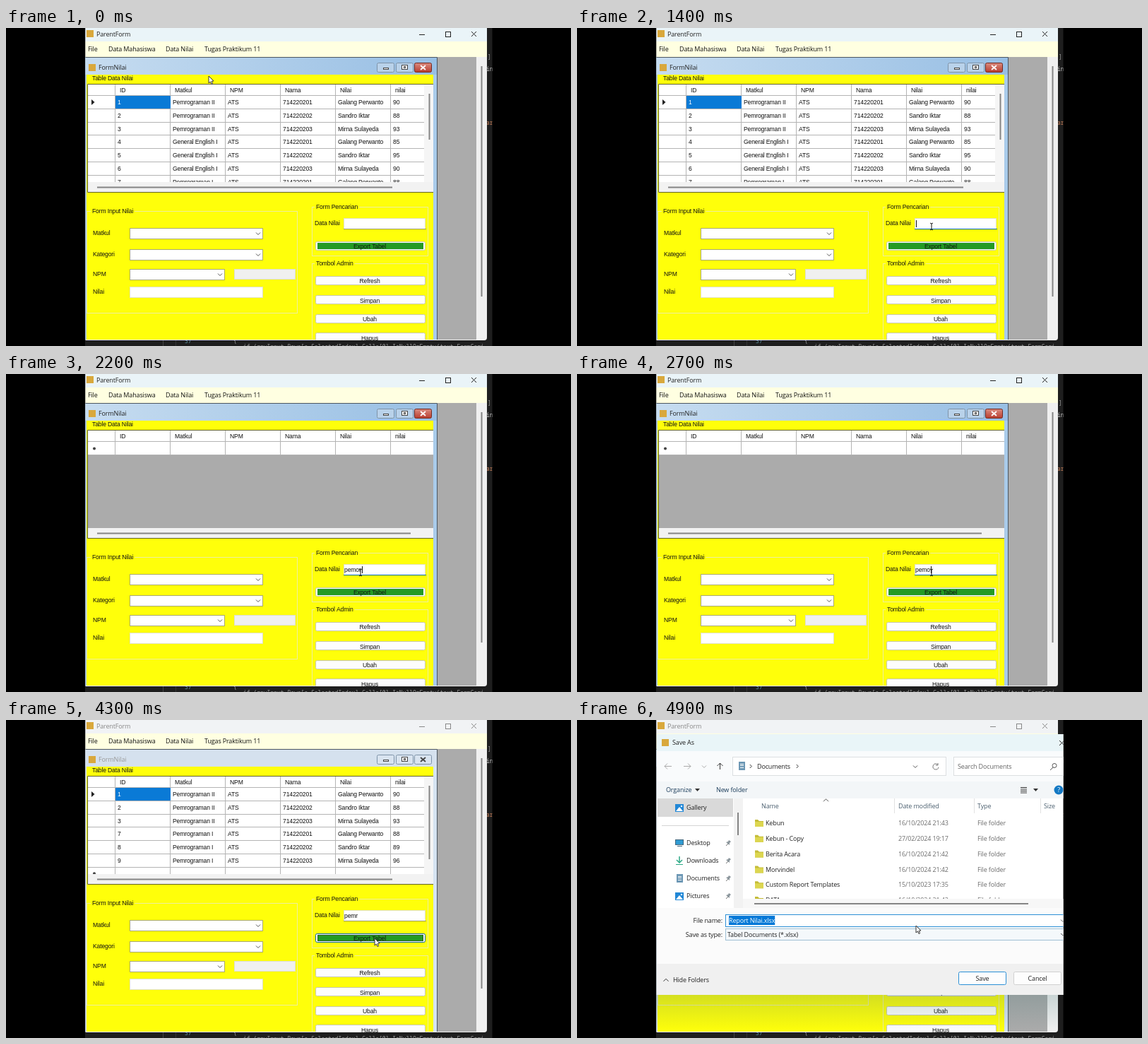
Write an HTML page with a canvas that moves like this. It is 800 px wide and 450 px high and loops after 5 s.

```html
<!DOCTYPE html>
<html lang="id">
<head>
<meta charset="utf-8">
<title>ParentForm</title>
<style>
html, body { margin: 0; width: 100%; height: 100%; overflow: hidden; background: #000; }
canvas { display: block; }
</style>
</head>
<body>
<canvas id="stage" width="800" height="450"></canvas>
<script>
const c = document.getElementById('stage').getContext('2d');
const LOOP = 5000;
const YELLOW = '#ffff0a', GRAY = '#ababab', BLUE = '#0078d7';
const UI = '9px "Open Sans", "Noto Sans", sans-serif';
const FORM = '8.6px "Liberation Sans", Arial, sans-serif';
const CODE = '8px "Noto Sans Mono", "DejaVu Sans Mono", monospace';

function rect(x, y, w, h, fill, stroke) {
  if (fill) { c.fillStyle = fill; c.fillRect(x, y, w, h); }
  if (stroke) { c.strokeStyle = stroke; c.lineWidth = 1; c.strokeRect(x + .5, y + .5, w - 1, h - 1); }
}
function round(x, y, w, h, r, fill, stroke) {
  c.beginPath(); c.roundRect(x + .5, y + .5, w - 1, h - 1, r);
  c.fillStyle = fill; c.fill();
  c.strokeStyle = stroke; c.lineWidth = 1; c.stroke();
}
function path(points, color, width = 1, fill) {
  c.beginPath();
  for (let i = 0; i < points.length; i += 2) c.lineTo(points[i], points[i + 1]);
  if (fill) { c.closePath(); c.fillStyle = fill; c.fill(); }
  if (color) { c.strokeStyle = color; c.lineWidth = width; c.stroke(); }
}
function disc(x, y, r, fill) {
  c.beginPath(); c.arc(x, y, r, 0, 7); c.fillStyle = fill; c.fill();
}
// y is the middle of the capitals
function text(s, x, y, color, font, spacing, align) {
  c.font = font; c.letterSpacing = spacing; c.textAlign = align;
  c.fillStyle = color; c.fillText(s, x, y + 3.2);
}
const ui = (s, x, y, color = '#222', align = 'left') => text(s, x, y, color, UI, '-0.15px', align);
const form = (s, x, y, color = '#111', align = 'left') => text(s, x, y, color, FORM, '-0.15px', align);
const code = (s, x, y, color = '#999') => text(s, x, y, color, CODE, '0px', 'left');
function clip(x, y, w, h, draw) {
  c.save(); c.beginPath(); c.rect(x, y, w, h); c.clip(); draw(); c.restore();
}
function gradient(x0, y0, x1, y1, from, to) {
  const g = c.createLinearGradient(x0, y0, x1, y1);
  g.addColorStop(0, from); g.addColorStop(1, to);
  return g;
}
function chevron(x, y, s, dir, color = '#555') {
  const d = { down: [-s, -s / 2, 0, s / 2, s, -s / 2], up: [-s, s / 2, 0, -s / 2, s, s / 2],
    right: [-s / 2, -s, s / 2, 0, -s / 2, s] }[dir];
  path(d.map((v, i) => v + (i % 2 ? y : x)), color);
}

// ---- timeline ----
const TYPING = [[0, ''], [1700, 'p'], [1800, 'pe'], [1900, 'pem'], [2100, 'pemo'], [2200, 'pemor'],
  [2700, 'pemo'], [2900, 'pem'], [3200, 'pemr']];
const MOVES = [[0, 287, 68], [100, 287, 68], [1200, 502, 281], [3700, 502, 281],
  [4100, 522, 309], [4600, 522, 309], [4800, 480, 291], [5000, 480, 291]];
const ease = u => u * u * (3 - 2 * u);

function pointer(t) {
  const i = MOVES.findIndex(m => m[0] > t), a = MOVES[i - 1], b = MOVES[i];
  const u = ease((t - a[0]) / (b[0] - a[0]));
  return [a[1] + (b[1] - a[1]) * u, a[2] + (b[2] - a[2]) * u];
}

// ---- table data ----
const SUBJECTS = ['Pemrograman II', 'General English I', 'Pemrograman I'];
const STUDENTS = ['Galang Perwanto', 'Sandro Iktar', 'Mirna Sulayeda'];
const ROWS = [90, 88, 93, 85, 95, 90, 88, 89, 96].map((mark, i) =>
  [i + 1, SUBJECTS[Math.floor(i / 3)], 'ATS', 714220201 + i % 3, STUDENTS[i % 3], mark]);
const COLS = [155, 233, 311, 389, 467, 545];
const HEADS = ['ID', 'Matkul', 'NPM', 'Nama', 'Nilai', 'nilai'];

function editorBehind() {
  rect(112, 0, 577, 450, '#1e1e1e');
  path([222.5, 441, 222.5, 450], '#444'); path([240.5, 441, 240.5, 450], '#333');
  code('37', 253, 443, '#5b8f9c');
  code('{', 322, 443);
  code('if (rowInput.Rows[e.SelectedIndex].Cells[0].IsNullOrEmpty(text.FormCari', 336, 451);
  code(']', 682, 41); code('in', 680, 58, '#ccc'); code('ar', 680, 134, '#c8805a');
}

function windowFrame(active) {
  const ink = active ? '#222' : '#888';
  rect(112, 0, 569, 442, '#f0f0f0');
  rect(112, 0, 569, 19, active ? '#eaf4f8' : '#f1f3f5');
  rect(114, 3, 10, 10, '#d9a83c');
  ui('ParentForm', 128, 8.5, ink);
  path([585, 9.5, 593, 9.5], ink);
  rect(622, 5, 8, 8, null, ink);
  path([659, 5, 666, 12], ink); path([666, 5, 659, 12], ink);
  rect(112, 19, 569, 22, '#ffffe1');
  [['File', 116], ['Data Mahasiswa', 145], ['Data Nilai', 226], ['Tugas Praktikum 11', 281]]
    .forEach(([s, x]) => ui(s, x, 30, '#111'));
  rect(112, 41, 554, 400, GRAY);
  path([673.5, 54, 673.5, 380], '#858585', 2);
}

function childFrame(active) {
  rect(112, 41, 499, 400, active ? '#a9cbea' : '#d5e3f1');
  rect(112, 42, 498, 24, active ? gradient(112, 0, 610, 0, '#c6dcf0', '#98bfe4') : '#d5e1ee');
  path([112, 41.5, 610.5, 41.5, 610.5, 441], '#4c5660');
  rect(117, 51, 10, 10, '#d9a83c');
  ui('FormNilai', 131, 56, active ? '#222' : '#999');
  [525, 552, 578].forEach((x, i) => {
    const red = active && i === 2, ink = red ? '#fff' : '#444';
    round(x, 49, 25, 14, 2, red ? gradient(0, 49, 0, 63, '#dc8f83', '#b8392b') : active ? '#b9d2ea' : '#d9e4f0',
      red ? '#72281f' : '#7e93a8');
    if (i === 0) rect(x + 9, 56, 8, 3, '#fff', ink);
    if (i === 1) rect(x + 8, 52, 9, 7, '#fff', ink), rect(x + 11, 54, 3, 3, null, ink);
    if (i === 2) path([x + 9, 53, x + 16, 59], ink, 1.8), path([x + 16, 53, x + 9, 59], ink, 1.8);
  });
  rect(114, 66, 491, 375, YELLOW);
}

function grid(query) {
  const empty = query.startsWith('pemo');
  const rows = empty ? [] : query ? ROWS.filter(r => r[1].startsWith('Pem')) : ROWS;
  const right = empty ? 605 : 592, line = '#b4b4b4';
  form('Table Data Nilai', 122, 70.5);
  rect(115, 79, 490, 154, empty ? GRAY : '#fff');
  rect(116, 80, 489, empty ? 34 : 16, '#fff');
  clip(115, 79, 490, 139, () => {
    HEADS.forEach((h, i) => form(h, COLS[i] + 6, 87.5));
    const bottom = empty ? 114 : 218;
    COLS.forEach(x => path([x - .5, 80, x - .5, bottom], line));
    for (let i = 0; i < (empty ? 2 : 7); i++) {
      const y = Math.round(95 + i * 18.75) + .5;
      path([116, y, right, y], line);
    }
    if (!empty) rect(155, 96, 78, 18, '#0a7ad6');
    rows.slice(0, 7).forEach((row, r) => row.forEach((v, i) =>
      form(v, COLS[i] + 3, 105 + r * 18.75, r + i ? '#111' : '#fff')));
    if (!empty) path([121, 101, 125.5, 105, 121, 109], null, 1, '#222');
    if (rows.length < 7) disc(125, 105.5 + rows.length * 18.75 - (rows.length ? .8 : 0), 2, '#444');
  });
  if (!empty) {
    rect(592, 80, 13, 152, '#f5f5f5');
    path([599.5, 93, 599.5, query ? 197 : 158], '#858585', 2);
  }
  rect(116, 218, 489, 14, '#f2f2f2');
  path([129, 225.5, empty ? 573 : 547, 225.5], '#858585', 2);
  path([605, 79.5, 115.5, 79.5, 115.5, 232.5, 605, 232.5], '#62622a');
}

function group(title, x, y, w, h, tx) {
  rect(x, y, w, h, null, '#eeee9c');
  c.font = FORM; c.letterSpacing = '-0.15px';
  rect(tx - 2, y - 3, c.measureText(title).width + 4, 7, YELLOW);
  form(title, tx, y);
}
function combo(x, y, w) {
  rect(x, y, w, 16, '#fff', '#a9a970');
  chevron(x + w - 7, y + 8, 3, 'down');
}
function button(label, y, textY, fill = '#fdfdfd', edge = '#c8c8b0') {
  round(438, y, 156, 13, 2, '#fdfdfd', edge);
  if (fill !== '#fdfdfd') rect(441, y + 2, 150, 9, fill);
  clip(438, y, 156, 12, () => form(label, 515, textY, '#111', 'center'));
}

function inputs(t, query, caret) {
  const focused = t >= 1300 && t < 4200, pressed = t >= 4200;
  group('Form Input Nilai', 114, 259, 299, 145, 122);
  [['Matkul', 290], ['Kategori', 320], ['NPM', 348], ['Nilai', 373]].forEach(([s, y]) => form(s, 123, y));
  combo(175, 283, 189); combo(175, 313, 189); combo(175, 341, 135);
  rect(323, 341, 87, 15, '#f0f0f0', '#deded0');
  rect(175, 366, 189, 16, '#fff', '#e2e2c0');

  group('Form Pencarian', 433, 253, 165, 70, 439);
  form('Data Nilai', 437, 276);
  rect(478, 269, 116, 16, '#fff', '#e2e2c0');
  rect(478, 284, 117, 1, focused ? '#0067b0' : '#999960');
  form(query, 479, 277);
  if (focused && caret) {
    const x = Math.round(480 + c.measureText(query).width);
    rect(x, 272, 1, 10, '#111');
  }
  button('Export Tabel', 302, 309, '#249a24', pressed ? '#0a64ad' : '#c8c8b0');
  if (pressed) {
    c.setLineDash([1, 1]); rect(441, 304, 150, 9, null, '#222'); c.setLineDash([]);
  }

  group('Tombol Admin', 433, 333, 165, 120, 439);
  button('Refresh', 351, 358); button('Simpan', 378, 386);
  button('Ubah', 405, 412); button('Hapus', 431, 438.5);
}

// ---- save dialog ----
function folder(x, y) {
  path([x, y - 5, x + 4, y - 5, x + 6, y - 3, x + 12, y - 3, x + 12, y + 5, x, y + 5], null, 1, '#c4bc38');
  rect(x, y - 2, 12, 7, '#dcd650');
}
function sheet(x, y) {
  rect(x - 4, y - 6, 9, 12, '#6d98b5');
  rect(x - 2, y - 3, 5, 1, '#fff'); rect(x - 2, y - 1, 5, 1, '#fff'); rect(x - 2, y + 2, 5, 1, '#fff');
}
function monitor(x, y) {
  rect(x - 6, y - 5, 12, 8, '#2f9bd3', '#41667d');
  rect(x - 3, y + 4, 7, 1, '#41667d');
}
function picture(x, y) {
  rect(x - 6, y - 5, 12, 11, '#2187d6');
  path([x - 5, y + 5, x, y - 1, x + 5, y + 5], null, 1, '#fff');
  disc(x + 3, y - 2, 1.2, '#fff');
}
function drive(x, y) {
  rect(x - 6, y, 12, 4, '#7d8a94'); rect(x - 4, y - 4, 9, 4, '#c4d0d8');
}
function download(x, y) {
  path([x, y - 6, x, y + 3], '#2aa884', 1.5);
  path([x - 4, y - 1, x, y + 3, x + 4, y - 1], '#2aa884', 1.5);
  path([x - 5, y + 5.5, x + 5, y + 5.5], '#2aa884');
}
function pin(x, y) {
  path([x - 3, y + 4, x, y + 1], '#777');
  path([x - 3, y - 1, x + 2, y + 3, x + 2, y, x + 4, y - 2, x + 1, y - 4, x, y - 2], null, 1, '#8b969c');
}

function navTree() {
  folder(139, 124); ui('Tio', 155, 124);
  chevron(125, 174, 3.5, 'down', '#333'); monitor(145, 174); ui('This PC', 155, 174);
  [['local disk SSD', 199], ['New Volume (E:)', 224]].forEach(([s, y]) => {
    chevron(131, y, 3, 'right'); drive(151, y); ui(s, 162, y);
  });
  rect(146, 193, 4, 4, '#2f9bd3');
  chevron(125, 249, 3, 'right'); monitor(145, 249); ui('Network', 155, 249);
}
function navTop() {
  rect(114, 111, 108, 26, '#d9d9d9');
  picture(145, 124); ui('Gallery', 155, 124);
  [['Desktop', monitor], ['Downloads', download], ['Documents', sheet], ['Pictures', picture]]
    .forEach(([s, icon], i) => {
      const y = 174 + i * 25;
      icon(145, y); ui(s, 155, y); pin(214, y);
    });
}

function dialog(t) {
  const top = t >= 4700, hover = pointer(t)[1] >= 295;
  rect(112, 389, 569, 52, gradient(0, 389, 0, 441, 'rgba(60,110,110,.22)', 'rgba(60,110,110,0)'));
  rect(113, 20, 576, 369, '#fff');
  rect(113, 20, 576, 24, '#e9f5f8');
  rect(120, 27, 10, 10, '#d9a83c');
  ui('Save As', 135, 32);
  path([683, 29, 690, 36], '#222'); path([690, 29, 683, 36], '#222');

  rect(113, 44, 576, 43, '#f9fbfc');
  const arrow = (x, s) => {
    path([x - 5 * s, 65.5, x + 5 * s, 65.5], '#aaa');
    path([x + s, 61.5, x + 5 * s, 65.5, x + s, 69.5], '#aaa');
  };
  arrow(129, -1); arrow(156, 1);
  chevron(180, 66, 3, 'down', '#aaa');
  path([202.5, 70, 202.5, 61], '#333'); path([198.5, 65, 202.5, 61, 206.5, 65], '#333');
  rect(220, 52, 303, 27, '#fff', '#dcdfe1');
  sheet(233, 65);
  chevron(246, 65.5, 2.5, 'right', '#333'); ui('Documents', 255, 65.5); chevron(312, 65.5, 2.5, 'right', '#333');
  chevron(479, 66, 3, 'down');
  c.beginPath(); c.arc(508, 66, 4, .2, 5.5); c.strokeStyle = '#777'; c.stroke();
  path([511, 61, 511, 64, 508, 64], '#777');
  rect(533, 52, 165, 27, '#fff', '#dcdfe1');
  ui('Search Documents', 539, 65.5, '#666');
  c.beginPath(); c.arc(676, 64.5, 3, 0, 7); c.strokeStyle = '#555'; c.stroke();
  path([674, 67, 670, 71], '#555');

  rect(113, 87, 576, 24, '#f3f6f8');
  ui('Organize', 126, 99, '#1d3e5c'); path([167, 97, 174, 97, 170.5, 101], null, 1, '#333');
  ui('New folder', 197, 99, '#1d3e5c');
  for (let y = 95; y < 104; y += 2.5) rect(628, y, 9, 1, '#333');
  path([646, 97, 653, 97, 649.5, 101], null, 1, '#333');
  disc(682, 99, 6.5, '#1479c4'); ui('?', 682, 99, '#fff', 'center');

  clip(113, 111, 108, 147, top ? navTop : navTree);
  path([120, 149.5, 215, 149.5], '#d5d5d5');
  rect(222, 111, 13, 155, '#f2f2f2');
  path([228, top ? 131 : 215, 228, top ? 163 : 247], '#858585', 2);

  [['Name', 261], ['Date modified', 455], ['Type', 567], ['Size', 661]]
    .forEach(([s, x]) => ui(s, x, 121.5, '#4c6070'));
  [449.5, 562.5, 656.5].forEach(x => path([x, 111, x, 132], '#e1e1e1'));
  chevron(352.5, 113.5, 3.5, 'up');
  clip(235, 132, 453, 121, () => [
    ['Kebun', '16/10/2024 21:43'], ['Kebun - Copy', '27/02/2024 19:17'],
    ['Berita Acara', '16/10/2024 21:42'], ['Morvindel', '16/10/2024 21:42'],
    ['Custom Report Templates', '15/10/2023 17:35'], ['DATA', '16/10/2024 21:42']
  ].forEach(([name, date], i) => {
    const y = 146 + i * 21.8;
    folder(252, y); ui(name, 267, y);
    ui(date, 455, y, '#6b6b6b'); ui('File folder', 567, y, '#6b6b6b');
  }));
  rect(235, 253, 454, 13, '#f7f7f7');
  path([251, 260, 639, 260], '#858585', 2);

  rect(113, 266, 576, 79, '#fbfbfb');
  ui('File name:', 206, 284, '#222', 'right');
  rect(210, 275, 490, 18, '#fff', '#2b8fd6');
  c.font = UI; c.letterSpacing = '-0.15px';
  rect(215, 277, c.measureText('Report Nilai.xlsx').width, 13, BLUE);
  ui('Report Nilai.xlsx', 215, 283.5, '#fff');
  ui('Save as type:', 206, 303.5, '#222', 'right');
  rect(210, 295, 490, 17, hover ? '#e8f2fa' : '#f4f8fb', hover ? '#3f93d0' : '#9fc0d4');
  ui('Tabel Documents (*.xlsx)', 213, 303.5);
  chevron(688, 284, 3, 'down'); chevron(688, 303.5, 3, 'down');

  rect(113, 345, 576, 44, '#f0f0f0');
  chevron(126, 368, 3.5, 'up', '#333'); ui('Hide Folders', 136, 367.5);
  round(540, 356, 68, 19, 2, '#fdfdfd', '#2b8fd6'); ui('Save', 574, 365.5, '#222', 'center');
  round(618, 356, 68, 19, 2, '#fdfdfd', '#d0d0d0'); ui('Cancel', 652, 365.5, '#222', 'center');
}

function cursor(t) {
  const [x, y] = pointer(t);
  if (t < 4300 && x > 478 && x < 594 && y > 269 && y < 285) {
    path([x - 2, y - 5, x, y - 4, x + 2, y - 5], '#111');
    path([x, y - 4, x, y + 4], '#111');
    path([x - 2, y + 5, x, y + 4, x + 2, y + 5], '#111');
  } else {
    path([0, 0, 0, 10, 2.4, 8, 4, 11.5, 5.6, 10.8, 4.1, 7.3, 7, 7, 0, 0].map((v, i) => v + (i % 2 ? y : x)),
      '#333', 1, '#fff');
  }
}

function draw(t) {
  const [since, query] = TYPING.filter(k => k[0] <= t).pop();
  const caret = (t - Math.max(since, 1300)) % 1060 < 530;
  const active = t < 4300;
  rect(0, 0, 800, 450, '#000');
  clip(112, 0, 576.5, 450, () => {
    editorBehind();
    c.save();
    c.beginPath(); c.roundRect(112.5, -5, 568.5, 447, [0, 0, 4, 0]); c.clip();
    windowFrame(active);
    childFrame(active);
    grid(query);
    inputs(t, query, caret);
    c.restore();
    if (t >= 4400) dialog(t);
    cursor(t);
  });
}

function tick() {
  draw(Math.floor(performance.now() % LOOP / 100) * 100);
  requestAnimationFrame(tick);
}
tick();
</script>
</body>
</html>
```
